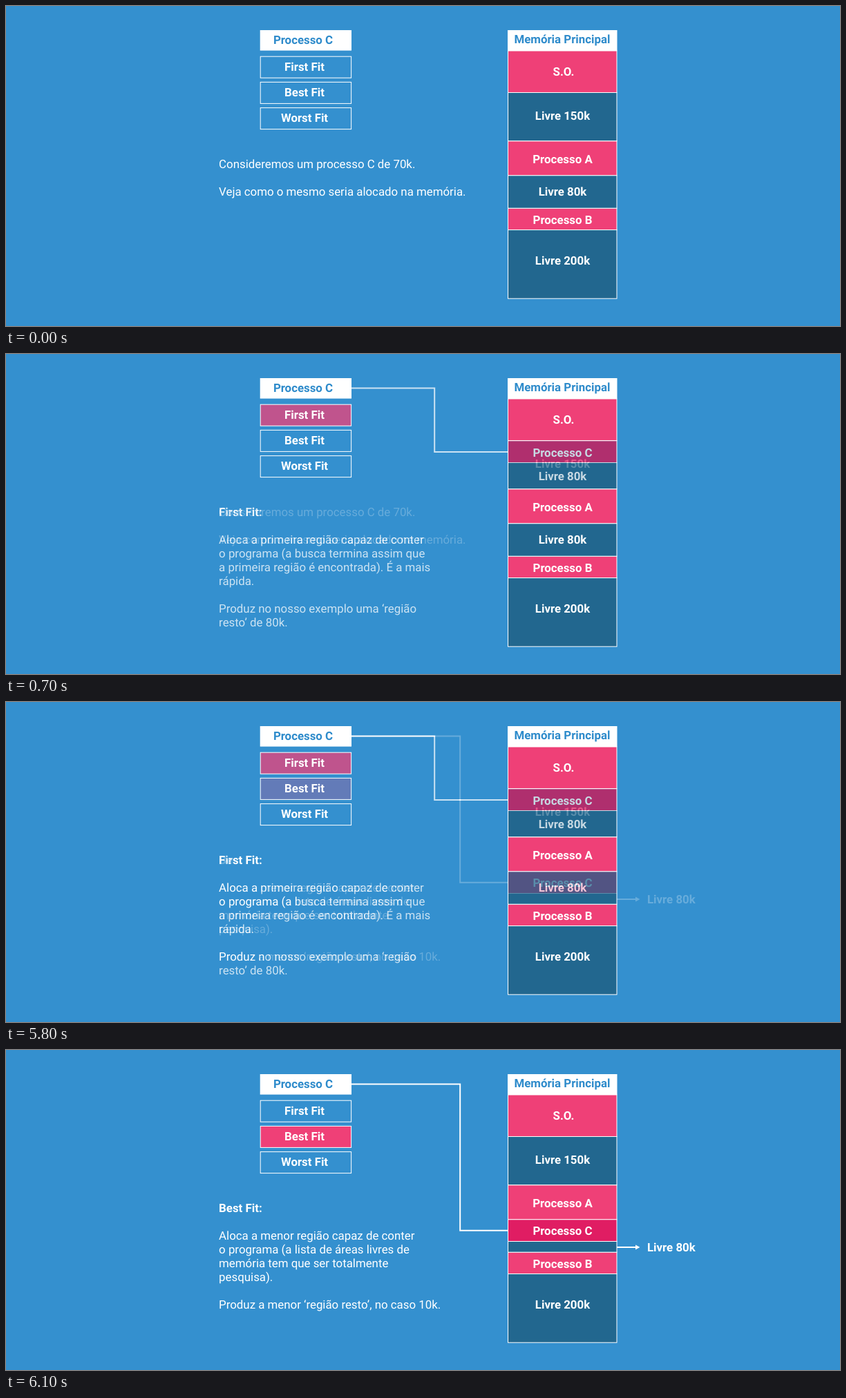
Animation of 1207 by 464 pixels, one loop 8 s. Source, as an HTML page:

```html
<!DOCTYPE html>
<html lang="pt">
<head>
<meta charset="utf-8">
<title>Alocação de memória</title>
<style>
html, body { margin: 0; width: 100%; height: 100%; overflow: hidden; background: #3490cf; }
svg { display: block; }
text { font: 16.85px Roboto, sans-serif; fill: #fff; text-rendering: geometricPrecision; }
.bold { font-weight: 700; }
.mid { text-anchor: middle; }
.head { fill: #2e8bcb; }
</style>
</head>
<body>
<svg id="stage" width="1207" height="464" viewBox="0 0 1207 464"></svg>
<script>
const BLUE = '#3490cf', PINK = '#ef4077', DARK = '#22678f', MAGENTA = '#e01d63';
const LOOP = 8000, STEP = 100, STEPS = 4;

const text = (x, y, s, cls = '') => `<text x="${x}" y="${y}" class="${cls}">${s}</text>`;
const label = (x, y, s, cls = '') => text(x, y, s, 'bold mid ' + cls);
const rect = (x, y, w, h, fill, stroke = 'none') =>
  `<rect x="${x}" y="${y}" width="${w}" height="${h}" fill="${fill}" stroke="${stroke}"/>`;
const line = d => `<path d="${d}" fill="none" stroke="#fff" stroke-width="2"/>`;

// A memory block: top, bottom, colour, label, baseline, label centre
const block = ([top, bottom, fill, name, y, x = 805.5]) =>
  rect(726.5, top, 157.5, bottom - top, fill, '#fff') + (name ? label(x, y, name) : '');

const wholeFirst = [[125.5, 195.7, DARK, 'Livre 150k', 165]];
const wholeSecond = [[245.8, 293.2, DARK, 'Livre 80k', 275]];

const scenes = [
  {
    blocks: [...wholeFirst, ...wholeSecond],
    lines: ['Consideremos um processo C de 70k.', '',
      'Veja como o mesmo seria alocado na memória.']
  },
  {
    pick: 'First Fit',
    blocks: [[125.8, 157.5, MAGENTA, 'Processo C', 148.7],
      [157.5, 195.7, DARK, 'Livre 80k', 183], ...wholeSecond],
    lines: ['First Fit:', '', 'Aloca a primeira região capaz de conter',
      'o programa (a busca termina assim que',
      'a primeira região é encontrada). É a mais', 'rápida.', '',
      'Produz no nosso exemplo uma ‘região', 'resto’ de 80k.'],
    extra: line('M500 49.5H620.2V142H726')
  },
  {
    pick: 'Best Fit',
    blocks: [...wholeFirst, [245.8, 277.5, MAGENTA, 'Processo C', 268],
      [277.5, 293.2, DARK]],
    lines: ['Best Fit:', '', 'Aloca a menor região capaz de conter',
      'o programa (a lista de áreas livres de',
      'memória tem que ser totalmente', 'pesquisa).', '',
      'Produz a menor ‘região resto’, no caso 10k.'],
    extra: line('M500 49.5H657.2V261.8H726') + line('M884 286H912') +
      '<path d="M911 282.4L917.5 286L911 289.6Z" fill="#fff"/>' +
      text(928, 292, 'Livre 80k', 'bold')
  }
];

function draw({ pick, blocks, lines, extra = '' }) {
  const options = ['First Fit', 'Best Fit', 'Worst Fit'].map((name, i) =>
    rect(368.2, 73.2 + i * 37.2, 131.4, 31, name === pick ? PINK : 'none', '#fff') +
    label(432, 94 + i * 37, name));
  const memory = [
    [65, 125.5, PINK, 'S.O.', 101.3, 807],
    [195.7, 245.8, PINK, 'Processo A', 227.5],
    [293.2, 324.6, PINK, 'Processo B', 315.7],
    [324.6, 424.2, DARK, 'Livre 200k', 375],
    ...blocks
  ].map(block);
  const note = lines.map((s, i) =>
    text(308.1, 234.8 + i * 20.06, s, pick && !i ? 'bold' : ''));
  return '<g>' + rect(0, 0, 1207, 464, BLUE) +
    rect(367.7, 35, 132.3, 29.6, '#fff') + label(430, 55, 'Processo C', 'head') +
    options.join('') + memory.join('') +
    rect(726, 35, 158.5, 30, '#fff') + label(805, 54, 'Memória Principal', 'head') +
    note.join('') + extra + '</g>';
}

const stage = document.getElementById('stage');
stage.innerHTML = scenes.map(draw).join('');
const [, first, best] = stage.children;

// Dissolve in hard steps of a quarter each
const fade = (t, start) =>
  Math.max(0, Math.min(STEPS, Math.floor((t - start) / STEP) + 1)) / STEPS;

function frame() {
  const t = performance.now() % LOOP;
  first.setAttribute('opacity', fade(t, 500));
  best.setAttribute('opacity', fade(t, 5800));
  requestAnimationFrame(frame);
}
frame();
</script>
</body>
</html>
```
